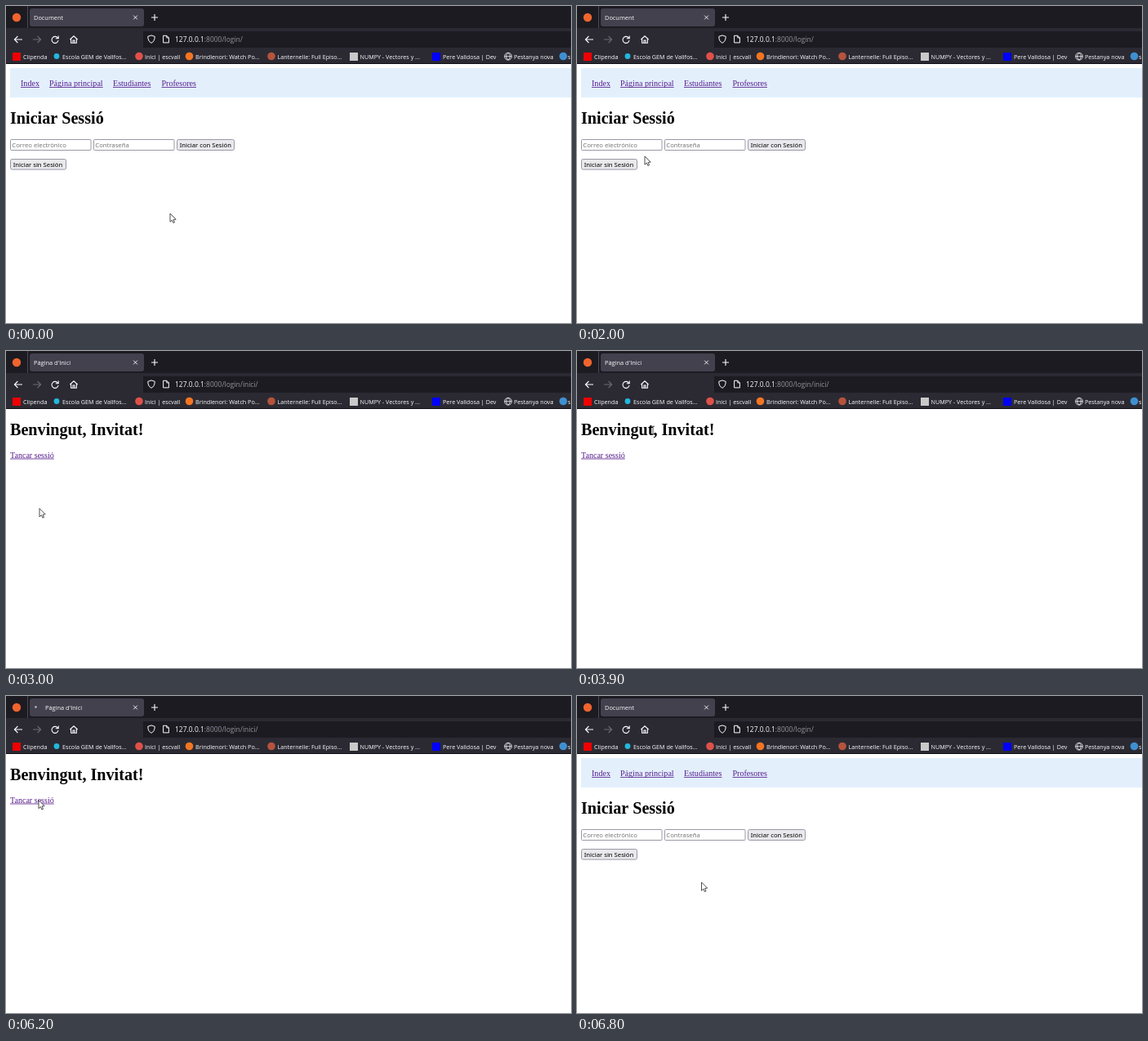
An HTML page with a canvas that plays this animation: 692 px wide and 388 px high, repeating every 7.6 s.

```html
<!DOCTYPE html>
<html lang="ca">
<head>
<meta charset="utf-8">
<title>Login</title>
<style>
  html, body { margin: 0; width: 100%; height: 100%; overflow: hidden; background: #fff; }
  canvas { display: block; width: 692px; height: 388px; }
</style>
</head>
<body>
<canvas id="stage" width="692" height="388"></canvas>
<script>
const ctx = document.getElementById('stage').getContext('2d');
const LOOP = 7600, STEP = 100;
const UI = '"Open Sans", "Noto Sans", sans-serif';
const FORM = '"Noto Sans", "Open Sans", sans-serif';
const SERIF = '"Liberation Serif", serif';
const H1 = `bold 20.15px ${SERIF}`, BODY = `10.07px ${SERIF}`;
const LIGHT = '#fbfbfe', LINK = '#551a8b';

// Pointer path: time, x, y
const PATH = [
  [0, 201, 254], [400, 168, 228], [800, 113, 190], [1000, 101.5, 176],
  [1100, 101.5, 176], [1700, 97, 181], [1900, 97, 181], [2300, 41, 192.7],
  [3200, 41, 192.7], [3700, 112, 93], [3900, 93, 97], [4100, 93, 97],
  [4900, 212.5, 100], [5400, 212.5, 100], [6000, 40, 131], [6100, 40, 127.5],
  [6200, 40, 127.5], [6800, 152.5, 228], [LOOP, 152.5, 228]
];

const BOOKMARKS = [
  ['square', 13, '#f00000', 21, 'Clipenda'],
  ['disc', 62, '#22b8dc', 69, 'Escola GEM de Vallfos...'],
  ['disc', 163, '#df5148', 170, 'Inici | escvall'],
  ['disc', 224.5, '#f47521', 232, 'Brindlenori: Watch Po...'],
  ['disc', 325, '#b5533c', 332.5, 'Lanternelle: Full Episo...'],
  ['square', 426, '#c9c9c9', 433.5, 'NUMPY - Vectores y ...'],
  ['square', 527, '#0000ff', 535, 'Pere Valldosa | Dev'],
  ['globe', 615, LIGHT, 622, 'Pestanya nova'],
  ['disc', 682.5, '#3f8fd0', 688, 's']
];

const MAIL = [5, 163, 99.5, 14], PASS = [107, 163, 99.5, 14];
const WITH = [209, 163, 71, 14], WITHOUT = [5, 187, 69, 13.6];
const TITLE_IN = [5, 126, 115, 23], TITLE_HOME = [5, 84.5, 164, 23];

function pointer(t) {
  const i = Math.max(1, PATH.findIndex(k => k[0] >= t));
  const [t0, x0, y0] = PATH[i - 1], [t1, x1, y1] = PATH[i];
  const p = (t - t0) / (t1 - t0);
  return { x: x0 + (x1 - x0) * p, y: y0 + (y1 - y0) * p };
}

const over = (p, [x, y, w, h]) => p.x >= x && p.x <= x + w && p.y >= y && p.y <= y + h;

function rect(x, y, w, h, color) {
  ctx.fillStyle = color;
  ctx.fillRect(x, y, w, h);
}

function box([x, y, w, h], r, fill, line) {
  ctx.beginPath();
  ctx.roundRect(x + .5, y + .5, w - 1, h - 1, r);
  ctx.fillStyle = fill;
  ctx.fill();
  if (line) stroke(line, .9);
}

function stroke(color, width) {
  ctx.strokeStyle = color;
  ctx.lineWidth = width;
  ctx.stroke();
}

function poly(points, closed) {
  ctx.beginPath();
  points.forEach(([x, y]) => ctx.lineTo(x, y));
  if (closed) ctx.closePath();
}

function path(d, x, y, color, width = 1.1) {
  ctx.save();
  ctx.translate(x, y);
  ctx.strokeStyle = color;
  ctx.lineWidth = width;
  ctx.stroke(new Path2D(d));
  ctx.restore();
}

function disc(x, y, r, color) {
  ctx.beginPath();
  ctx.arc(x, y, r, 0, 7);
  ctx.fillStyle = color;
  ctx.fill();
}

function text(str, x, y, font, color) {
  ctx.font = font;
  ctx.fillStyle = color;
  ctx.fillText(str, x, y);
  return ctx.measureText(str).width;
}

function link(str, x, y) {
  const w = text(str, x, y, BODY, LINK);
  rect(x, y + 1, w, .8, LINK);
}

function drawTab(title, loading, t) {
  rect(0, 0, 692, 28, '#1c1b22');
  rect(26, 0, 1, 27, '#4b4a55');
  disc(13, 14, 5.2, '#f0642d');
  ctx.beginPath();
  ctx.roundRect(29, 3, 140, 22, 3);
  ctx.fillStyle = '#42414d';
  ctx.fill();
  if (loading) disc(36.5 + 3 * Math.sin((t - 6200) / 160), 13.5, 1.2, '#c4c4cc');
  text(title, loading ? 48 : 34, 17, `7.4px ${UI}`, LIGHT);
  path('M-2.4-2.4L2.4 2.4M2.4-2.4L-2.4 2.4', 158.5, 14, LIGHT, .9);
  path('M-4 0H4M0-4V4', 182, 14, LIGHT);
}

function drawToolbar(page) {
  rect(0, 27, 692, 44, '#2b2a33');
  rect(168, 31, 524, 20, '#1c1b22');
  path('M5 0H-4.4M-.6-4L-4.6 0L-.6 4', 15, 41, LIGHT);
  path('M-5 0H4.4M.6-4L4.6 0L.6 4', 38, 41, '#6c6b74');
  path('M3.6-1.5A4 4 0 1 0 4 1M4.2-4.6V-1.2H.8', 60, 41, LIGHT);
  path('M-4.6 0L0-4.2L4.6 0M-3.4-1V4.3H3.4V-1M-1 4V1H1V4', 83, 41, LIGHT);
  path('M0-4.6L4.2-3.2C4.3 1 2.5 3.6 0 4.8C-2.5 3.6-4.3 1-4.2-3.2Z', 178, 40.5, LIGHT, 1);
  path('M-3.4-4.2H.8L3.4-1.6V4.4H-3.4ZM.8-4.2V-1.6H3.4', 196, 40.5, LIGHT, 1);
  const font = `8.48px ${UI}`;
  const w = text('127.0.0.1', 207, 44, font, LIGHT);
  text(page, 207 + w, 44, font, '#96959f');
  for (const [shape, x, color, tx, label] of BOOKMARKS) {
    if (shape === 'disc') disc(x, 61.5, x === 62 ? 3.4 : 4.8, color);
    else if (shape === 'square') rect(x - 5, 57, 10, 10, color);
    else path('M-4.4 0A4.4 4.4 0 1 0 4.4 0A4.4 4.4 0 1 0-4.4 0H4.4M0-4.4C-3-2-3 2 0 4.4C3 2 3-2 0-4.4', x, 61.7, color, .8);
    text(label, tx, 64.6, `7.2px ${UI}`, LIGHT);
  }
  rect(0, 70, 692, 1, '#0f0e14');
}

function field(area, hint, p) {
  box(area, 1, '#fff', over(p, area) ? '#55555f' : '#8f8f9d');
  text(hint, area[0] + 2.3, 173, `7.7px ${FORM}`, '#757575');
}

function button(area, label, p, pressed) {
  const hot = over(p, area);
  box(area, 2, pressed ? '#b1b1b9' : hot ? '#d0d0d7' : '#e9e9ed', pressed || hot ? '#676774' : '#8f8f9d');
  text(label, area[0] + 3.7, area[1] + 9.9, `7.7px ${FORM}`, '#000');
}

function drawLogin(p, t) {
  rect(5, 76, 687, 36, '#e3f0fc');
  link('Index', 18, 98);
  link('Página principal', 53, 98);
  link('Estudiantes', 131, 98);
  link('Profesores', 190.5, 98);
  text('Iniciar Sessió', 5, 144.3, H1, '#000');
  field(MAIL, 'Correo electrónico', p);
  field(PASS, 'Contraseña', p);
  button(WITH, 'Iniciar con Sesión', p, false);
  button(WITHOUT, 'Iniciar sin Sesión', p, t === 2700);
}

function drawHome(p, t) {
  const head = 'Benvingut', tail = ', Invitat!';
  const w = text(head, 5, 102.8, H1, '#000');
  text(tail, 5 + w, 102.8, H1, '#000');
  if (t >= 4200 && t < 5300) {
    let n = 0;
    while (n < tail.length && 5 + w + ctx.measureText(tail.slice(0, n + 1)).width <= p.x + 2) n++;
    const sel = ctx.measureText(tail.slice(0, n)).width;
    rect(5 + w, 84.5, sel, 23, '#0078d7');
    text(tail.slice(0, n), 5 + w, 102.8, H1, '#fff');
  }
  link('Tancar sessió', 5, 130.6);
}

function drawPointer(p, beam) {
  ctx.save();
  ctx.translate(p.x, p.y);
  if (beam) {
    path('M-2-4.8H2M0-4.8V4.8M-2 4.8H2', 0, 0, '#333', .9);
  } else {
    poly([[0, 0], [0, 10.2], [2.4, 8.1], [3.9, 11.5], [5.5, 10.8], [4.1, 7.4], [7.2, 7.2]], true);
    ctx.fillStyle = '#fff';
    ctx.fill();
    stroke('#222', .8);
  }
  ctx.restore();
}

function draw(now) {
  const t = Math.floor((now % LOOP) / STEP) * STEP;
  const p = pointer(t);
  const home = t >= 2900 && t < 6300;
  const loading = t === 2800 || t === 6200;
  rect(0, 0, 692, 388, '#fff');
  drawTab(home ? "Pàgina d'Inici" : 'Document', loading, t);
  drawToolbar(home ? ':8000/login/inici/' : ':8000/login/');
  (home ? drawHome : drawLogin)(p, t);
  const areas = home ? [TITLE_HOME] : [MAIL, PASS, TITLE_IN];
  drawPointer(p, areas.some(a => over(p, a)));
}

const start = performance.now();
function tick() {
  draw(performance.now() - start);
  requestAnimationFrame(tick);
}
tick();
</script>
</body>
</html>
```
